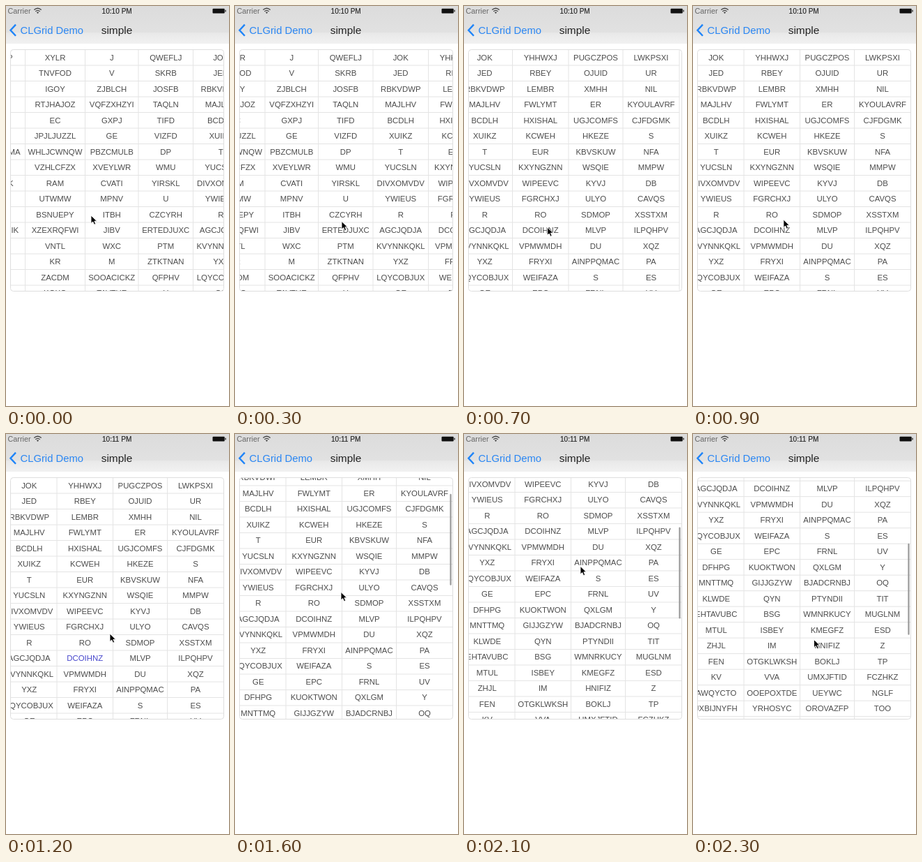
An HTML page for the animation above (2400 ms loop, 320 px wide and 573 px high).

```html
<!DOCTYPE html>
<html lang="en">
<head>
<meta charset="utf-8">
<title>CLGrid Demo</title>
<style>
  html, body { margin: 0; width: 100%; height: 100%; overflow: hidden; background: #fff; }
  svg { display: block; width: 320px; height: 573px; }
  text { font-family: "Liberation Sans", Arial, sans-serif; }
  .cells text { font-size: 11.4px; text-anchor: middle; fill: #4c4c4c; }
  .cells text.picked { fill: #4646cc; }
  .centred { text-anchor: middle; fill: #222; }
</style>
</head>
<body>
<svg viewBox="0 0 320 573">
  <defs>
    <linearGradient id="bar" x1="0" y1="0" x2="0" y2="1">
      <stop offset="0" stop-color="#dcdcdc"/>
      <stop offset=".69" stop-color="#e1e1e1"/>
      <stop offset=".72" stop-color="#e9e9e9"/>
      <stop offset="1" stop-color="#f1f1f1"/>
    </linearGradient>
    <clipPath id="view"><rect x="6.5" y="62.5" width="306" height="346" rx="4"/></clipPath>
  </defs>

  <rect width="320" height="573" fill="#fff"/>
  <rect width="320" height="54" fill="url(#bar)"/>

  <text x="2.5" y="11" font-size="10.8" fill="#666">Carrier</text>
  <g fill="none" stroke="#444" stroke-width="1.3">
    <path d="M40.3 5.6Q45.5 .9 50.7 5.6M42.3 7.8Q45.5 5 48.7 7.8"/>
    <path d="M43.8 9L45.5 10.9L47.2 9Q45.5 7.8 43.8 9Z" fill="#444" stroke="none"/>
  </g>
  <text id="clock" class="centred" x="159.2" y="11" font-size="10.1" stroke="#222" stroke-width=".15"></text>
  <rect x="296.5" y="3.8" width="17.2" height="6.6" rx="1" fill="#111"/>
  <rect x="314.3" y="5.6" width="1.5" height="3" rx=".6" fill="#444"/>

  <path d="M14 26.6L6.5 34.7L14 42.8" fill="none" stroke="#1f84f8" stroke-width="2.4"/>
  <text x="20.5" y="40" font-size="14.8" fill="#2b87f3">CLGrid Demo</text>
  <text class="centred" x="159" y="40" font-size="15.4">simple</text>

  <g clip-path="url(#view)">
    <g id="grid">
      <path id="lines" fill="none" stroke="#e4e4e4"/>
      <g id="cells" class="cells"></g>
    </g>
    <rect id="thumb" x="308.4" width="2.2" height="131" rx="1.1" fill="#999"/>
  </g>
  <rect x="6.5" y="62.5" width="306" height="346" rx="4" fill="none" stroke="#dedede"/>
  <path id="cursor" d="M0 0V11.4L2.7 9L4.6 13.2L6.7 12.3L4.9 8.2H8.5Z" fill="#000" stroke="#fff" stroke-width=".9"/>
</svg>

<script>
const LOOP = 2400, STEP = 100, ROW = 22.5, TOP = 62.5, RIGHT = 312.5, ROWS = 30;

const columns = [
  { width: 82, words: 'BUVEXP - - - - - WQXHVRMA - SHQVNK - - EZLHYTGIK' },
  { width: 86, words: 'XYLR TNVFOD IGOY RTJHAJOZ EC JPJLJUZZL WHLJCWNQW VZHLCFZX RAM UTWMW BSNUEPY XZEXRQFWI VNTL KR ZACDM KGXG' },
  { width: 76.5, words: 'J V ZJBLCH VQFZXHZYI GXPJ GE PBZCMULB XVEYLWR CVATI MPNV ITBH JIBV WXC M SOOACICKZ TAVTUE' },
  { width: 78.5, words: 'QWEFLJ SKRB JOSFB TAQLN TIFD VIZFD DP WMU YIRSKL U CZCYRH ERTEDJUXC PTM ZTKTNAN QFPHV U' },
  { width: 79.5, words: 'JOK JED RBKVDWP MAJLHV BCDLH XUIKZ T YUCSLN DIVXOMVDV YWIEUS R AGCJQDJA KVYNNKQKL YXZ LQYCOBJUX GE DFHPG MNTTMQ KLWDE EHTAVUBC MTUL ZHJL FEN KV AWQYCTO JXBIJNYFH' },
  { width: 80.5, words: 'YHHWXJ RBEY LEMBR FWLYMT HXISHAL KCWEH EUR KXYNGZNN WIPEEVC FGRCHXJ RO DCOIHNZ VPMWMDH FRYXI WEIFAZA EPC KUOKTWON GIJJGZYW QYN BSG ISBEY IM OTGKLWKSH VVA OOEPOXTDE YRHOSYC' },
  { width: 78, words: 'PUGCZPOS OJUID XMHH ER UGJCOMFS HKEZE KBVSKUW WSQIE KYVJ ULYO SDMOP MLVP DU AINPPQMAC S FRNL QXLGM BJADCRNBJ PTYNDII WMNRKUCY KMEGFZ HNIFIZ BOKLJ UMXJFTID UEYWC OROVAZFP' },
  { width: 81, words: 'LWKPSXI UR NIL KYOULAVRF CJFDGMK S NFA MMPW DB CAVQS XSSTXM ILPQHPV XQZ PA ES UV Y OQ TIT MUGLNM ESD Z TP FCZHKZ NGLF TOO' }
];

const $ = id => document.getElementById(id);
const mix = (a, b, p) => a + (b - a) * p;
const span = (t, from, to) => Math.min(1, Math.max(0, (t - from) / (to - from)));
const smooth = p => p * p * (3 - 2 * p);
const settle = p => 1 - (1 - p) ** 2;

// A flick runs out, a second one overshoots the edge, then springs back
function panAt(t) {
  if (t < 300) return mix(275, 204.5, settle(span(t, 0, 300)));
  if (t < 700) return mix(204.5, -3.5, smooth(span(t, 300, 700)));
  return mix(-3.5, 0, settle(span(t, 700, 900)));
}

const scrollAt = t => 211.5 * Math.max(0, (t - 1200) / 1000) ** 1.45;

const stops = [
  { t: 0, x: 122, y: 300 }, { t: 300, x: 153, y: 308.5 }, { t: 700, x: 119.5, y: 317 }, { t: 1200, x: 149, y: 286 },
  { t: 1600, x: 152, y: 226.5 }, { t: 2100, x: 167, y: 189.5 }, { t: 2300, x: 173.5, y: 294.5 }
];

function cursorAt(t) {
  const i = Math.max(1, stops.findIndex(s => s.t >= t));
  const a = stops[i - 1], b = stops[i];
  const p = smooth(span(t, a.t, b.t));
  return [mix(a.x, b.x, p), mix(a.y, b.y, p)];
}

function buildGrid() {
  const total = columns.reduce((sum, c) => sum + c.width, 0);
  let x = RIGHT - total;
  let d = `M${RIGHT} ${TOP}v${ROW * ROWS}`;
  for (let r = 0; r <= ROWS; r++) d += `M${x} ${TOP + r * ROW}h${total}`;

  for (const { width, words } of columns) {
    d += `M${x} ${TOP}v${ROW * ROWS}`;
    words.split(' ').forEach((word, r) => {
      if (word === '-') return;
      const cell = document.createElementNS('http://www.w3.org/2000/svg', 'text');
      cell.setAttribute('x', x + width / 2);
      cell.setAttribute('y', TOP + r * ROW + 15);
      cell.textContent = word;
      $('cells').append(cell);
    });
    x += width;
  }
  $('lines').setAttribute('d', d);
}

function draw(t) {
  const scroll = scrollAt(t);
  $('grid').setAttribute('transform', `translate(${panAt(t)} ${-scroll})`);
  $('thumb').setAttribute('y', 64.5 + scroll * .38);
  $('thumb').setAttribute('opacity', scroll > 0 ? 1 : 0);
  $('cursor').setAttribute('transform', `translate(${cursorAt(t)})`);
  $('clock').textContent = t < 1000 ? '10:10 PM' : '10:11 PM';
  picked.classList.toggle('picked', t >= 1000 && t < 1300);
}

buildGrid();
const picked = [...$('cells').children].find(cell => cell.textContent === 'DCOIHNZ');

function tick() {
  const t = performance.now() % LOOP;
  draw(Math.floor(t / STEP) * STEP);
  requestAnimationFrame(tick);
}
tick();
</script>
</body>
</html>
```
